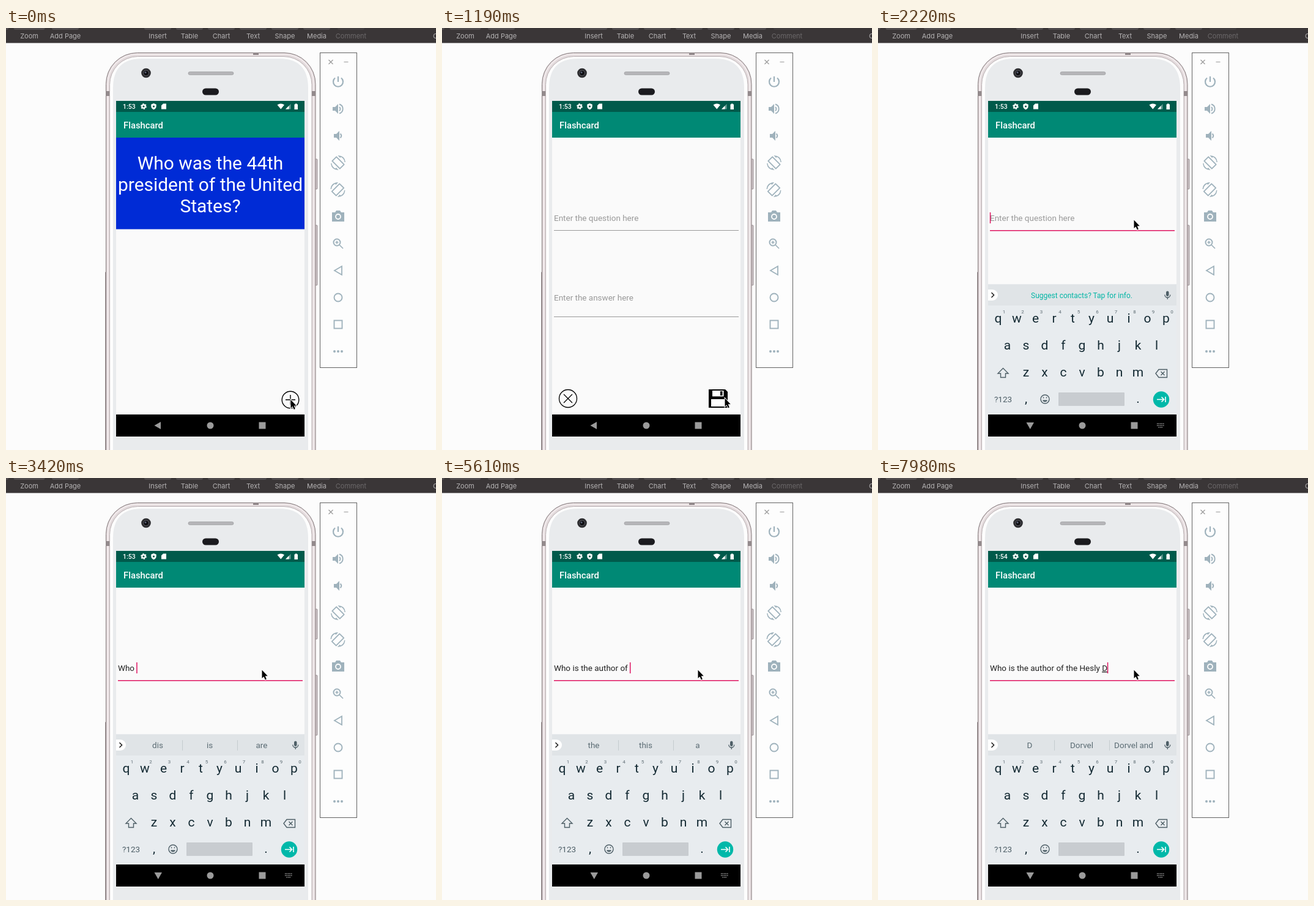
Animation of 703 by 689 pixels, one loop 8000 ms. Source, as an HTML page:

```html
<!DOCTYPE html>
<html lang="en">
<head>
<meta charset="utf-8">
<title>Flashcard demo</title>
<style>
html, body { margin: 0; width: 100%; height: 100%; overflow: hidden; background: #fcfcfc; }
svg { display: block; font-family: Roboto, sans-serif; }
text { white-space: pre; }
.mid { text-anchor: middle; }
.line { fill: none; stroke: currentColor; }
.bar { font: 11px Inter, sans-serif; fill: #b5b3b4; }
.key { font-size: 21px; fill: #142a33; }
.num { font-size: 8px; fill: #5d6b72; }
.field { font-size: 13.48px; }
.hint { fill: #999; }
.sug { font-size: 13.48px; fill: #5b6c74; }
</style>
</head>
<body>
<svg width="703" height="689" viewBox="0 0 703 689">
  <defs>
    <clipPath id="screen"><rect x="180" y="119" width="308" height="548"/></clipPath>
    <clipPath id="content"><rect x="180" y="119" width="308" height="512"/></clipPath>
    <clipPath id="reveal"><rect id="revealBox" x="180" y="119" width="308" height="548"/></clipPath>
    <g id="window">
      <rect x="180" y="100" width="308" height="37" fill="#005a4b"/>
      <rect x="180" y="137" width="308" height="42" fill="#008975"/>
      <rect x="180" y="179" width="308" height="452" fill="#fafafa"/>
      <rect x="180" y="631" width="308" height="60"/>
      <text x="192" y="164" font-size="14.800" font-weight="500" fill="#fff">Flashcard</text>
    </g>
  </defs>

  <!-- desktop toolbar -->
  <rect width="703" height="24.500" fill="#3a3637"/>
  <g id="toolbar"></g>

  <!-- phone body -->
  <g fill="#cfc6c8" stroke="#8c8284" stroke-width=".8">
    <rect x="505" y="214" width="4" height="49" rx="1"/>
    <rect x="505" y="322" width="4" height="98" rx="1"/>
    <rect x="162.4" y="399" width="4" height="300"/>
  </g>
  <rect x="163.5" y="40.5" width="342.5" height="720" rx="51" fill="#e3dadc" stroke="#83797b"/>
  <rect x="166.5" y="43" width="336.5" height="720" rx="48" fill="none" stroke="#f5eff0" stroke-width="1.5"/>
  <rect x="169.5" y="46.5" width="330.5" height="720" rx="46" fill="#fdfdfd" stroke="#b9b0b2"/>
  <path d="M175 700V98Q175 50 222 50H447Q494 50 494 98V700Z" fill="#e9ebed"/>
  <path d="M163 103h6v8h-6zM500 103h6v8h-6zM404 40h9v4h-9z" fill="#938a8c"/>
  <rect x="298" y="71.500" width="74" height="5" rx="2.500" fill="#b5b5b8" stroke="#98989b" stroke-width=".6"/>
  <rect x="321" y="98.500" width="27" height="11" rx="5.500" fill="#1b1b1f"/>
  <circle cx="229" cy="73.500" r="7.800" fill="#2b2b2e"/>
  <circle cx="229" cy="73.500" r="4.500" fill="#0e0e12" stroke="#66666c"/>
  <circle cx="228" cy="72.500" r="1.500" fill="#5a6074"/>

  <g clip-path="url(#screen)">
    <g id="card">
      <use href="#window"/>
      <rect x="180" y="179" width="308" height="149.500" fill="#002bd6"/>
      <g class="mid" font-size="29.950" fill="#fff">
        <text x="334" y="230.500">Who was the 44th</text>
        <text x="334" y="265.500">president of the United</text>
        <text x="334" y="300.500">States?</text>
      </g>
      <g class="line" stroke-width="1.400">
        <circle cx="465" cy="607" r="13.800"/>
        <path d="M457 607h16M465 599v16"/>
      </g>
    </g>

    <g clip-path="url(#reveal)">
      <g id="form">
        <use href="#window"/>
        <text id="hint" class="field hint" x="183" y="315">Enter the question here</text>
        <text class="field hint" x="183" y="445">Enter the answer here</text>
        <path d="M183 330.500h302M183 471.500h302" stroke="#999"/>
        <g class="line" stroke-width="1.300">
          <circle cx="206" cy="605" r="14.500"/>
          <path d="M199 598l14 14M213 598l-14 14"/>
        </g>
        <path d="M436 590h27l4 4v26h-31z"/>
        <path d="M442 592h18.500v9.500H442zM440 606h23v12h-23z" fill="#fff"/>
        <rect x="455" y="593" width="3.500" height="7"/>
        <g id="focus">
          <rect x="183" y="330" width="302" height="1.500" fill="#df1461"/>
          <text class="field" x="183" y="315" fill="#212121"><tspan id="done"></tspan><tspan id="word" text-decoration="underline"></tspan></text>
          <rect id="caret" y="301" width="1.500" height="18" fill="#df1461"/>
        </g>
      </g>
    </g>

    <g clip-path="url(#content)">
      <g id="keyboard">
        <rect x="180" y="418.500" width="308" height="213" fill="#e8ecef"/>
        <rect x="180" y="418.500" width="308" height="34.500" fill="#e0e4e7"/>
        <path d="M180 427h7a9 9 0 0 1 0 18h-7z" fill="#fff"/>
        <path class="line" d="M185.500 432l4 4-4 4" color="#222" stroke-width="1.600"/>
        <text id="tip" class="mid" x="333" y="441" font-size="11.980" fill="#00b5a5">Suggest contacts? Tap for info.</text>
        <g id="sugs" class="mid">
          <path d="M288.500 428v17M378.500 428v17" stroke="#c5cbcf"/>
          <text class="sug" x="248" y="441"></text>
          <text class="sug" x="333" y="441"></text>
          <text class="sug" x="418" y="441"></text>
        </g>
        <g color="#4d5e66">
          <rect x="471" y="429.500" width="4.500" height="8.500" rx="2.250" fill="currentColor"/>
          <path class="line" d="M468.800 435.500a4.500 4.500 0 0 0 9 0M473.300 440v3" stroke-width="1.300"/>
          <g class="line" stroke-width="1.400">
            <path d="M204.500 555.500l8.500 8.500h-4.500v6.500h-8v-6.500H196z"/>
            <path d="M459 557.500h13.500v13H459l-5-6.500zM462.500 561l6 6M468.500 561l-6 6"/>
            <circle cx="273" cy="606" r="7"/>
            <path d="M269 607.500a4.200 4.200 0 0 0 8 0z" fill="currentColor" stroke="none"/>
            <path d="M270.500 602.500v2M275.500 602.500v2"/>
          </g>
          <text class="mid" x="204.500" y="611" font-size="13.480" fill="currentColor">?123</text>
        </g>
        <g id="keys" class="mid"></g>
        <rect x="295" y="595" width="108" height="22" rx="1" fill="#c8ccd0"/>
        <circle cx="463" cy="606.500" r="13.200" fill="#00b8a9"/>
        <path class="line" d="M456 606.500h11M463.500 602.500l4 4-4 4M470 602v9" color="#fff" stroke-width="1.600"/>
      </g>
    </g>

    <!-- status bar -->
    <text id="clock" x="191" y="132" font-size="10.500" font-weight="500" fill="#fff"></text>
    <g fill="#fff">
      <circle cx="225" cy="128" r="2.700" fill="none" stroke="#fff" stroke-width="2.200"/>
      <circle cx="225" cy="128" r="4.200" fill="none" stroke="#fff" stroke-width="1.400" stroke-dasharray="2.200"/>
      <path d="M241.500 123l4.200 1.700v3q0 3.700-4.200 5.500-4.200-1.800-4.200-5.500v-3z"/>
      <circle cx="241.500" cy="128" r="1.600" fill="#005a4b"/>
      <path d="M257 123.500h5v9h-8v-6zM443.500 125.500q5.800-4 11.500 0l-5.700 7zM471.500 124.500h1.500v-1h2.500v1h1.500v8.500h-5.500z"/>
      <path d="M457 132.500l8.500-8.500v8.500z" opacity=".4"/>
      <path d="M457 132.500l5.500-5.500v5.500z"/>
    </g>

    <!-- navigation bar -->
    <g fill="#9b9b9b">
      <path id="back" d="M242.500 649l10.500-6v12z"/>
      <path id="down" d="M242.500 644h12.500l-6.250 11z"/>
      <circle cx="334" cy="649" r="5.500"/>
      <rect x="413.500" y="643.500" width="11" height="11"/>
      <path id="dots" d="M456 646h12M456 649h12M458.500 652h7" stroke="#9b9b9b" stroke-width="1.500" stroke-dasharray="1.500 1"/>
    </g>
  </g>

  <!-- emulator controls -->
  <rect x="513.500" y="40.500" width="60" height="514" fill="#fdfdfd" stroke="#636363"/>
  <path d="M527.500 52l7 7M534.500 52l-7 7M552.500 55.500h7" stroke="#9a9a9a" stroke-width="1.200"/>
  <g color="#9fb2bc" fill="#9fb2bc">
    <g class="line" stroke-width="2.200">
      <path d="M538 81.500a8 8 0 1 0 10 0M543 79v9"/>
      <path d="M545 129q3 3 0 6.500M545 124.500a7.800 7.800 0 0 1 0 15" stroke-width="1.900"/>
      <path d="M546.500 172.500q3.500 3.500 0 7" stroke-width="2"/>
      <circle cx="541" cy="350" r="5.500" stroke-width="2"/>
      <path d="M545 354l6 6M538.500 350h5M541 347.500v5" stroke-width="1.700"/>
      <path d="M537 396l12-7v14z" stroke-width="1.800"/>
      <circle cx="543" cy="440" r="6.500" stroke-width="1.900"/>
      <rect x="536.500" y="477.500" width="13" height="13" stroke-width="1.900"/>
    </g>
    <g id="turn">
      <path class="line" d="M533.300 217.200l6.900-6.900 12.500 12.500-6.900 6.900z" stroke-width="1.800" stroke-linejoin="round"/>
      <path id="arrow" d="M547.500 210.500q5.400 2.600 6 8.500h1.500q-1-10.500-12-11l-.6.100 3.800 3.800z"/>
      <use href="#arrow" transform="rotate(180 543 220)"/>
    </g>
    <use href="#turn" transform="translate(1085.500 44) scale(-1 1)"/>
    <path d="M534 129h4l5-5v16l-5-5h-4zM536 173h4l5-5v16l-5-5h-4z"/>
    <path d="M534 301h4l2-3h6l2 3h5v15h-20v-15z"/>
    <circle cx="543" cy="308" r="4" fill="none" stroke="#fdfdfd" stroke-width="1.800"/>
    <circle cx="537" cy="528" r="2"/><circle cx="543" cy="528" r="2"/><circle cx="549" cy="528" r="2"/>
  </g>

  <path id="pointer" d="M0 0V13.500L3 10.700 5.200 15.800 7.400 14.900 5.200 9.800H9.300Z" stroke="#fff" stroke-width="1.800" paint-order="stroke"/>
</svg>

<script>
const $ = id => document.getElementById(id);
const show = (id, on) => $(id).style.display = on ? '' : 'none';
const label = (cls, x, y, s) => `<text class="${cls}" x="${x}" y="${y}">${s}</text>`;

$('toolbar').innerHTML = '<rect x="-20" y="-8" width="24" height="11" rx="3" fill="#514d4f"/>' +
  [['Zoom', 38, 51], ['Add Page', 97, 44], ['Insert', 248], ['Table', 300], ['Chart', 352],
   ['Text', 404], ['Shape', 456], ['Media', 508], ['Comment', 564]].map(([s, x, w = 44]) => {
    const dim = s === 'Comment';
    return `<g opacity="${dim ? .4 : 1}"><rect x="${x - w / 2}" y="-8" width="${w}" height="11" rx="3" fill="#514d4f"/>` +
      label('bar mid', x, 17, s) + '</g>';
  }).join('') + label('bar', 698, 17, 'Collaborate');

const row = (s, x, y) => [...s].map((c, i) => label('key', x + i * 30.5, y, c)).join('');
$('keys').innerHTML = row('qwertyuiop', 196.5, 481) + row('asdfghjkl', 211.5, 525) +
  row('zxcvbnm', 242, 569) + label('key', 242, 612, ',') + label('key', 425, 612, '.') +
  [...'1234567890'].map((c, i) => label('num', 206 + i * 30.5, 466, c)).join('');

// time, characters typed, word suggestions
const sentence = 'Who is the author of the Hesly D';
const typing = [
  [2520, 1], [2970, 2], [3120, 3],
  [3420, 4, 'dis is are'], [3570, 5, 'i is in'], [3720, 6, 'is isn’t it'],
  [3860, 7, 'the a your'], [4000, 8, 't the to'], [4140, 9, 'th the this'],
  [4290, 11, 'best most first'], [4430, 12, 'a actual answer'],
  [4580, 13, 'au author audience'], [4730, 14, 'aut auto author'],
  [4880, 15, 'auth author authority'], [5020, 16, 'autho author authors'],
  [5170, 17, 'author authors authority'], [5320, 18, 'of and is'],
  [5470, 19, 'o of on'], [5610, 21, 'the this a'], [5760, 22, 't the this'],
  [5900, 23, 'th the this'], [6050, 25, 'book first article'],
  [6500, 26, 'H House Hospital'], [6800, 27, 'He Her Head'], [6950, 28, 'Hes Hesitate Hesitant'],
  [7100, 29, 'Hesl Hesly Help'], [7240, 30, 'Hesly Heavily Help'], [7390, 31, 'and Dorvel is'],
  [7830, 32, 'D Dorvel Dorvel_and']
];
const sugTexts = document.querySelectorAll('#sugs text');

function type(t) {
  const [, n, words] = typing.findLast(s => t >= s[0]) || [0, 0];
  const text = sentence.slice(0, n), cut = text.lastIndexOf(' ') + 1;
  $('done').textContent = text.slice(0, cut);
  $('word').textContent = text.slice(cut);
  $('caret').setAttribute('x', 182.8 + (n ? $('done').parentNode.getComputedTextLength() : 0));
  show('hint', !n);
  show('tip', !words);
  show('sugs', words);
  if (words) words.split(' ').forEach((w, i) => sugTexts[i].textContent = w.replace('_', ' '));
}

function pointerAt(t) {
  if (t < 140) return [465.5, 607];
  if (t < 890) return [462.5, 607];
  const k = Math.max(0, Math.min(4, Math.floor((t - 1340) / 146.6) + 1)) / 4;
  const p = k * k * (3 - 2 * k);
  return [462.5 - 44 * p, 604.5 - 291 * p];
}

function draw(t) {
  const open = t < 890 ? 0 : t < 1040 ? .18 : t < 1190 ? .93 : 1;
  show('form', open);
  $('card').setAttribute('transform', `translate(0 ${-11 * open})`);
  $('form').setAttribute('transform', `translate(0 ${22 * (1 - open)})`);
  $('revealBox').setAttribute('y', 119 + 548 * (1 - open));

  const keys = t >= 2080;
  show('focus', t >= 1930);
  show('keyboard', keys);
  show('down', keys);
  show('dots', keys);
  show('back', !keys);
  $('keyboard').setAttribute('transform', `translate(0 ${t < 2220 ? 45 : 0})`);
  type(t);
  $('clock').textContent = t < 7980 ? '1:53' : '1:54';
  $('pointer').setAttribute('transform', `translate(${pointerAt(t)})`);
}

const start = performance.now();
function tick() {
  draw((performance.now() - start) % 8000);
  requestAnimationFrame(tick);
}
tick();
</script>
</body>
</html>
```
